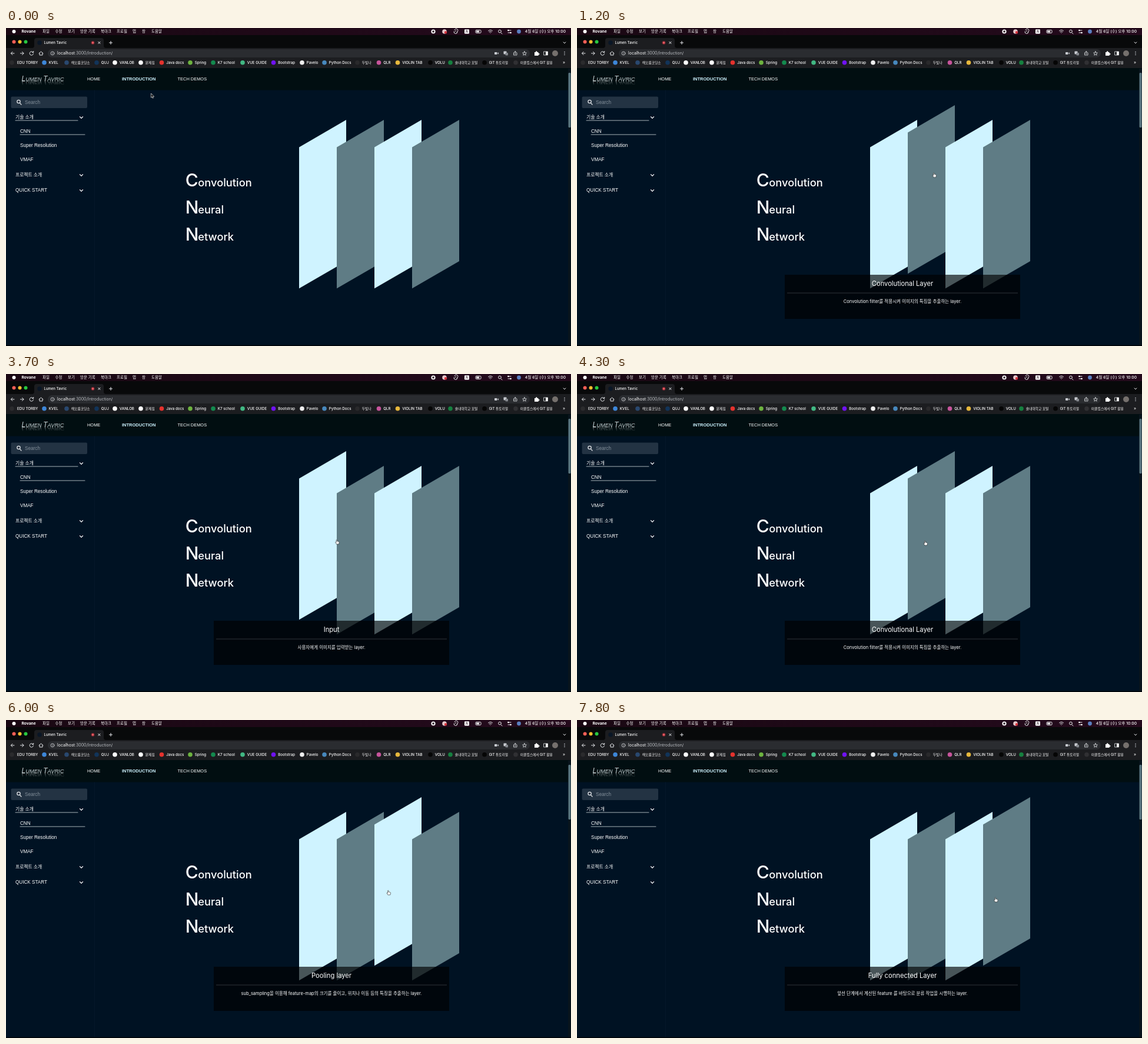
These frames come from a looping animation (960 by 540 pixels, 8000 ms). An HTML page:

```html
<!DOCTYPE html>
<html lang="ko">
<head>
<meta charset="utf-8">
<title>Lumen Tavric</title>
<style>
  html, body { margin: 0; width: 100%; height: 100%; overflow: hidden; background: #001223; }
  svg { display: block; width: 960px; height: 540px; }
  text { fill: #fff; font-family: Inter, "Noto Sans CJK KR", "Noto Sans CJK", sans-serif; }
  .arial text { font-family: "Liberation Sans", "Noto Sans CJK KR", "Noto Sans CJK", sans-serif; }
  .mid text { text-anchor: middle; }
  .line { fill: none; stroke: #e8eaed; stroke-width: 1; stroke-linecap: round; stroke-linejoin: round; }
</style>
</head>
<body>
<svg viewBox="0 0 960 540">
  <defs>
    <linearGradient id="bar"><stop stop-color="#1a0813"/><stop offset="1" stop-color="#240a1c"/></linearGradient>
    <linearGradient id="fade" gradientUnits="userSpaceOnUse" x1="0" y1="0" x2="0" y2="-7">
      <stop stop-color="#fff" stop-opacity=".5"/><stop offset="1" stop-color="#fff" stop-opacity="0"/>
    </linearGradient>
  </defs>

  <!-- system bar -->
  <rect width="960" height="12" fill="url(#bar)"/>
  <circle cx="13.5" cy="6" r="3" fill="#fff"/>
  <g id="menu"></g>
  <circle cx="726" cy="6" r="3.6" fill="#fff"/><rect x="724.5" y="4.5" width="3" height="3" fill="#26101f"/>
  <circle cx="745" cy="6" r="3.8" fill="#e8c9cc"/><circle cx="747" cy="7.5" r="2.2" fill="#d8333c"/>
  <path class="line" d="M762 3.5a3 3 0 1 1 4 3.5M761 6a3 3 0 1 0 6 1M763 6l2-2"/>
  <rect x="779" y="2.2" width="8" height="7.6" rx="1.2" fill="#fff"/>
  <text x="783" y="8.4" font-size="6.5" text-anchor="middle" style="fill:#26101f">A</text>
  <rect class="line" x="798" y="3.5" width="9" height="5" rx="1.2"/><rect x="799.2" y="4.7" width="5" height="2.6" fill="#fff"/>
  <path class="line" d="M819.5 4.8q3.5-3 7 0M821 6.6q2-1.6 4 0M823 8.5v0"/>
  <path class="line" d="M841 8l2 2M841.4 5.6a2.4 2.4 0 1 1-4.8 0a2.4 2.4 0 1 1 4.8 0"/>
  <path class="line" d="M853 4h5M853 8h5"/><circle cx="853.5" cy="4" r="1.3" fill="#fff"/><circle cx="857.5" cy="8" r="1.3" fill="#fff"/>
  <circle cx="871.5" cy="6" r="3.4" fill="#5a7fc0"/>

  <!-- tab strip and toolbar -->
  <rect y="12" width="960" height="22" fill="#08090a"/>
  <path d="M0 34H44q4 0 4-4V21q0-4 4-4H162q4 0 4 4V30q0 4 4 4H960V69H0z" fill="#1c1d20"/>
  <circle cx="13.5" cy="23.5" r="3" fill="#ff5f57"/><circle cx="23.5" cy="23.5" r="3" fill="#febc2e"/><circle cx="33.5" cy="23.5" r="3" fill="#28c840"/>
  <circle cx="57" cy="25" r="3.8" fill="#0a1626"/>
  <text x="64.5" y="27.2" font-size="6" font-weight="500">Lumen Tavric</text>
  <circle cx="147.5" cy="25" r="3" fill="#7c2730"/><circle cx="147.5" cy="25" r="1.8" fill="#ee6066"/>
  <path class="line" d="M156.7 23.3l3.4 3.4m0-3.4l-3.4 3.4M175.5 25h5m-2.5-2.5v5M947 24l2 2l2-2"/>
  <rect x="71" y="36" width="819" height="14" rx="7" fill="#2a2c30"/>
  <path class="line" d="M14 43H8.5m2.5-2.6L8.4 43l2.6 2.6M24.5 43H30m-2.5-2.6l2.6 2.6l-2.6 2.6"/>
  <path class="line" d="M45.8 41a3.2 3.2 0 1 0 .7 2.6M46.7 39.5v2h-2M56 43l3.5-3l3.5 3M57 42.5v3.5h5v-3.5"/>
  <circle class="line" cx="79" cy="43" r="3" style="stroke-width:.7"/><path class="line" d="M79 42.8v1.6M79 41.4v0" style="stroke-width:.7"/>
  <text x="87" y="45.4" font-size="7"><tspan>localhost</tspan><tspan style="fill:#b9bcc0">:3000/Introduction/</tspan></text>
  <g fill="#c9ccd1">
    <rect x="830" y="41" width="4.5" height="4" rx=".7"/><path d="M835 43l2-1.7v3.4z"/>
    <rect x="845.5" y="39.5" width="5" height="5" rx=".8"/><rect x="848.5" y="42" width="4.5" height="4.5" rx=".8" fill="#85898f"/>
    <path d="M898 41h2a1.3 1.3 0 1 1 2.5 0h2v2a1.3 1.3 0 1 1 0 2.2v1.8h-6.5z" fill="#fff"/>
    <rect x="917" y="40" width="3.5" height="6" fill="#fff"/>
    <circle cx="933" cy="43" r="5" fill="#75706d"/>
    <circle cx="949" cy="40.5" r=".8"/><circle cx="949" cy="43" r=".8"/><circle cx="949" cy="45.5" r=".8"/>
  </g>
  <g class="line" style="stroke-width:.8">
    <path d="M863.5 42h-1v4h5.5v-4h-1M865.2 44.5v-5m-1.5 1.5l1.5-1.5l1.5 1.5"/>
    <path d="M881 39.7l1 2.3l2.4.2l-1.8 1.6l.6 2.4l-2.2-1.3l-2.2 1.3l.6-2.4l-1.8-1.6l2.4-.2z"/>
    <rect x="914" y="40" width="6.5" height="6"/>
  </g>
  <g id="marks"></g>

  <!-- page -->
  <rect y="68" width="960" height="472" fill="#001223"/>
  <rect y="68" width="960" height="37.5" fill="#010e11"/>
  <rect x="150" y="105.5" width="1" height="434" fill="#05172a"/>
  <rect x="955" y="69" width="5" height="470" fill="#08141c"/>
  <rect x="955.5" y="76" width="4" height="93" rx="1.5" fill="#58757f"/>
  <rect y="538.5" width="960" height="1.5" fill="#000307"/>
  <g class="arial" font-style="italic" id="logo"></g>
  <g class="arial" id="nav"></g>
  <rect x="8.5" y="116.5" width="129.5" height="19.5" rx="2" fill="#233343"/>
  <path class="line" d="M23.3 127.3l2.7 2.7M24.2 125a2.7 2.7 0 1 1-5.4 0a2.7 2.7 0 1 1 5.4 0" style="stroke-width:1.2"/>
  <g class="arial" id="side"></g>
  <path class="line" d="M16 157H122M24 181H134" style="stroke-width:.8;stroke:#d4dade"/>
  <path class="line" d="M125.5 150.8l2.5 2.5l2.5-2.5M125.5 248.8l2.5 2.5l2.5-2.5M125.5 274.8l2.5 2.5l2.5-2.5" style="stroke-width:1.3"/>
  <g id="heads" font-weight="500"></g>
  <g id="cards"></g>
  <g id="panel" class="mid">
    <rect x="353" y="419" width="400" height="75" fill="#000" fill-opacity=".65"/>
    <path d="M357 450H749" stroke="#fff" stroke-opacity=".24" stroke-width=".8"/>
  </g>

  <g id="cursor">
    <path id="arrow" d="M-2-4V3.2L-.4 1.8L.7 4.2L1.8 3.7L.8 1.4H3z" fill="#000" stroke="#fff" stroke-width=".7"/>
    <path id="hand" d="M-1.4 .6V-3.2q.7-1 1.4 0V-.9q.8-.6 1.3.1q.8-.3 1.2.4q.8-.1.9.7V1.8L2.6 4H-1.1L-3 1q0-1 1-.6z" fill="#fff" stroke="#111" stroke-width=".6"/>
  </g>
</svg>
<script>
const LOOP = 8000, LIFT = 300;
const byId = id => document.getElementById(id);

function add(parent, tag, attrs, content = '') {
  const el = document.createElementNS('http://www.w3.org/2000/svg', tag);
  for (const key in attrs) el.setAttribute(key, attrs[key]);
  el.textContent = content;
  return parent.appendChild(el);
}
const label = (parent, x, y, size, str, more) =>
  add(parent, 'text', { x, y, 'font-size': size, ...more }, str);

// rows: [time, value, easing]
function play(el, prop, rows) {
  el.animate(rows.map(([t, v, easing = 'linear']) => ({ offset: t / LOOP, [prop]: v, easing })),
    { duration: LOOP, iterations: Infinity });
}

function showDuring(el, spans) {
  const rows = [[0, 0, 'step-end']];
  for (const [from, to] of spans) {
    if (from === 0) rows[0][1] = 1;
    else rows.push([from, 1, 'step-end']);
    if (to < LOOP) rows.push([to, 0, 'step-end']);
  }
  rows.push([LOOP, rows[rows.length - 1][1]]);
  play(el, 'opacity', rows);
}

function liftDuring(el, spans) {
  const down = 'translate(0px,0px)', up = 'translate(0px,-25px)';
  const rows = [[0, down]];
  for (const [from, to] of spans) {
    rows.push([from, down, 'ease'], [from + LIFT, up]);
    if (to < LOOP) rows.push([to, up, 'ease'], [to + LIFT, down]);
  }
  rows.push([LOOP, rows[rows.length - 1][1]]);
  play(el, 'transform', rows);
}

// system bar
label(byId('menu'), 26.5, 8.4, 6.7, 'Rovane', { 'font-weight': 700 });
[[62, '파일'], [83.5, '수정'], [105, '보기'], [126, '방문 기록'], [161, '북마크'],
 [188, '프로필'], [215, '탭'], [231, '창'], [247, '도움말']]
  .forEach(([x, s]) => label(byId('menu'), x, 8.4, 6.5, s, { 'font-weight': 500 }));
label(byId('menu'), 951, 8.4, 6.7, '4월 6일 (수) 오후 10:00', { 'text-anchor': 'end', 'font-weight': 500 });

// bookmarks
[[10, '#2b2b2d', 'EDU TORBY'], [65, '#3d86d8', 'KVEL'], [103, '#29486f', '해오름코딩소'],
 [154, '#123459', 'QUJ'], [185, '#fff', 'VANLOB'], [229, '#fff', '문제집'],
 [264.5, '#e5322d', 'Java docs'], [313, '#6db33f', 'Spring'], [352, '#138a4e', 'K7 school'],
 [402, '#41b883', 'VUE GUIDE'], [454.5, '#7012f5', 'Bootstrap'], [503, '#eee', 'Pavelo'],
 [541, '#4788bd', 'Python Docs'], [597, '#29292b', '두빛나'], [633.5, '#c8549c', 'QLR'],
 [665.5, '#e7b83c', 'VIOLIN TAB'], [721, '#050505', 'VOLU'], [755, '#15803f', '솔내대학교 포털'],
 [813, '#050505', 'GIT 튜토리얼'], [866, '#303033', '이클립스에서 GIT 활용']]
  .forEach(([x, fill, s]) => {
    const hangul = /[가-힣]/.test(s);
    add(byId('marks'), 'circle', { cx: x, cy: 58.8, r: 3.8, fill });
    label(byId('marks'), x + (x === 10 ? 9 : 7.8), 61, hangul ? 5.75 : 6.2, s, { 'font-weight': 500 });
  });
label(byId('marks'), 946, 61, 7, '»');

// header
const logo = byId('logo');
for (const flip of [1, -1]) {
  const t = add(logo, 'text', { transform: `translate(26.5 ${flip > 0 ? 89.5 : 90.3}) scale(1 ${flip})` });
  t.style.fill = flip > 0 ? '#c9d2d4' : 'url(#fade)';
  [['L', 12], ['UMEN ', 9.3], ['T', 12], ['AVRIC', 9.3]]
    .forEach(([s, size]) => add(t, 'tspan', { 'font-size': size }, s));
}
label(byId('nav'), 138, 89.2, 7.45, 'HOME');
label(byId('nav'), 197, 89.2, 7.5, 'INTRODUCTION', { 'font-weight': 700, style: 'fill:#cff3ff' });
label(byId('nav'), 291.5, 89.2, 7.45, 'TECH DEMOS');

// sidebar
label(byId('side'), 32, 128.7, 8.2, 'Search', { style: 'fill:#84909b' });
[[16, 154, '기술 소개'], [24, 178.2, 'CNN'], [24, 202.2, 'Super Resolution'],
 [24, 226.2, 'VMAF'], [16, 252, '프로젝트 소개'], [16, 278.2, 'QUICK START']]
  .forEach(([x, y, s]) => label(byId('side'), x, y, /[가-힣]/.test(s) ? 7.8 : 8.15, s));

// headline
[['C', 'onvolution'], ['N', 'eural'], ['N', 'etwork']].forEach(([cap, rest], i) => {
  const y = 269 + 46 * i;
  label(byId('heads'), 304.7, y, 30, cap);
  label(byId('heads'), 326.3, y, 18.3, rest);
});

// layers: title, text, hover spans
const layers = [
  ['Input', '사용자에게 이미지를 입력받는 layer.', [[1538, 3720]]],
  ['Convolutional Layer', 'Convolution filter를 적용시켜 이미지의 특징을 추출하는 layer.', [[485, 1380], [3720, 5620]]],
  ['Pooling layer', 'sub_sampling을 이용해 feature-map의 크기를 줄이고, 위치나 이동 등의 특징을 추출하는 layer.', [[5620, 7115]]],
  ['Fully connected Layer', '앞선 단계에서 계산된 feature 를 바탕으로 분류 작업을 시행하는 layer.', [[7115, LOOP]]]
];
layers.forEach(([title, body, spans], i) => {
  const x = 498 + 64 * i;
  const card = add(byId('cards'), 'path', {
    d: `M${x} 202.5l80-46.5v240l-80 46.2z`, fill: i % 2 ? '#5f7c85' : '#cff3ff'
  });
  liftDuring(card, spans);
  const info = add(byId('panel'), 'g', {});
  label(info, 553, 438.2, 11.2, title);
  label(info, 553, 466.6, 7.5, body);
  showDuring(info, spans.map(([a, b]) => [a, b === 1380 ? 1538 : b]));
});
showDuring(byId('panel'), [[485, LOOP]]);

// pointer
const route = [
  [0, 248.5, 115], [100, 248.5, 115, 'cubic-bezier(.6,0,.9,.5)'], [500, 609.5, 247, 'ease-out'],
  [800, 613, 250], [1100, 611, 249, 'ease-in'], [1538, 562, 255], [1700, 523, 259],
  [1800, 522.5, 260], [1850, 522.5, 261], [2000, 520, 265], [2250, 520, 265], [2500, 522, 264],
  [2750, 522, 264, 'ease-in-out'], [3200, 523, 283], [3350, 523, 283, 'ease-in'],
  [3700, 562.5, 285, 'ease-out'], [4100, 592, 287], [5150, 592, 287, 'ease-in'],
  [5600, 625, 290, 'ease-out'], [6000, 650, 293], [6900, 680, 296], [7100, 696, 298, 'ease-out'],
  [7500, 711.5, 305], [LOOP, 711.5, 305]
];
play(byId('cursor'), 'transform', route.map(([t, x, y, e]) => [t, `translate(${x}px,${y}px)`, e]));
showDuring(byId('arrow'), [[0, 450]]);
showDuring(byId('hand'), [[450, LOOP]]);
</script>
</body>
</html>
```
